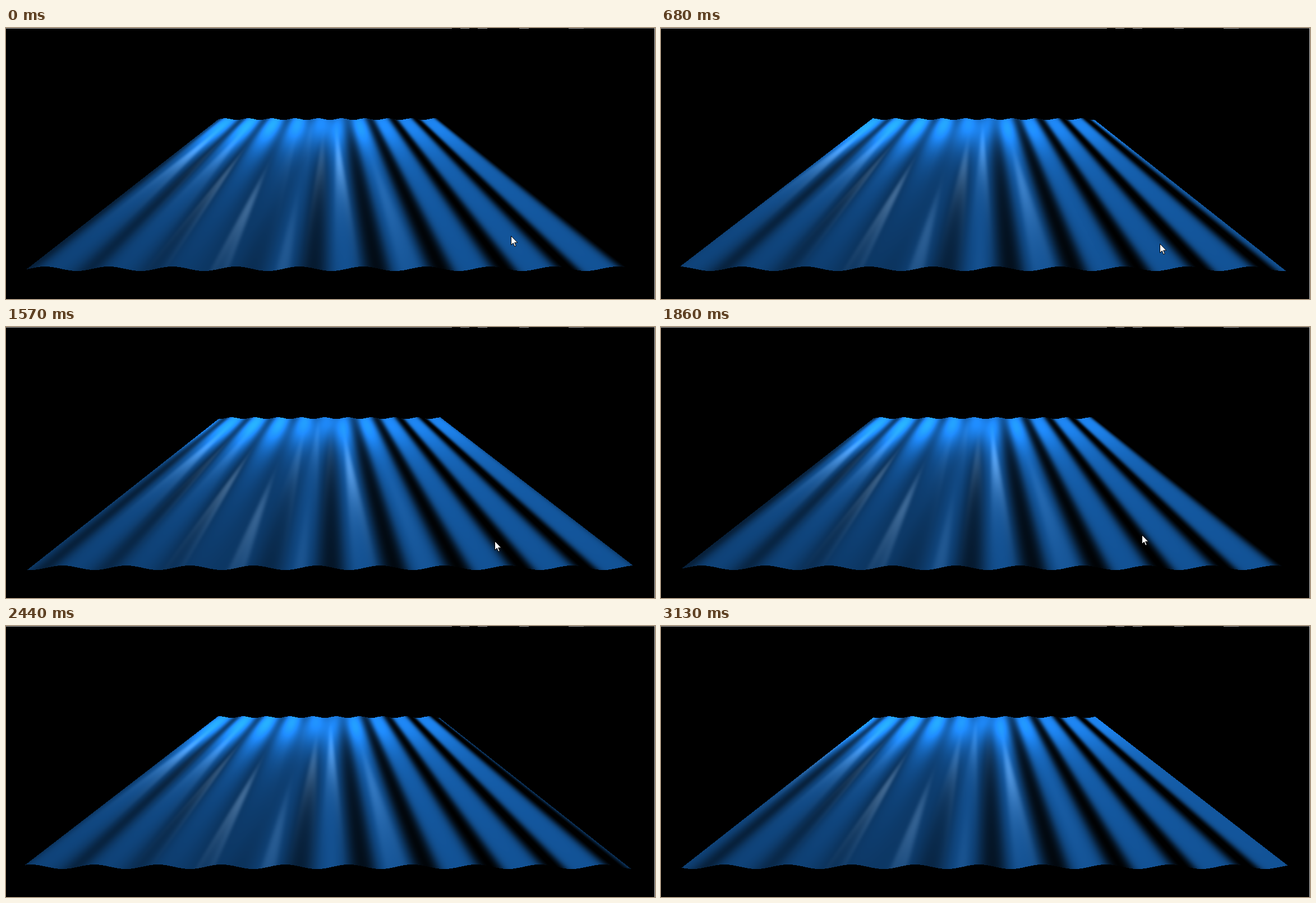
An HTML page with a canvas that plays this animation: 1157x484 px, repeating every 3360 ms.

```html
<!DOCTYPE html>
<html lang="en">
<head>
<meta charset="utf-8">
<title>Wave surface</title>
<style>
  html, body { margin: 0; width: 100%; height: 100%; overflow: hidden; background: #000; }
  canvas { display: block; }
</style>
</head>
<body>
<canvas id="stage" width="1157" height="484"></canvas>
<script>
const ctx = document.getElementById('stage').getContext('2d');
const LOOP = 3360, PERIOD = 113.4;
const CX = 576, HORIZON = 8.4, DEPTH = 421.6;   // vanishing point, height of the near edge below it
const FAR = 0.366, HALF = 540, AMP = 4;
const BOX = { x: 30, y: 156, w: 1092, h: 284 };

// Moments at which the picture advances
const run = (a, b, n) => Array.from({ length: n }, (_, i) => a + (b - a) * i / (n - 1));
const steps = [0, ...run(30, 180, 4), ...run(330, 410, 3), ...run(470, 680, 5),
  ...run(870, 1060, 4), ...run(1120, 1360, 6), ...run(1480, 1570, 3), ...run(1630, 1860, 6),
  1930, 2000, ...run(2060, 2440, 7), 2630, 2910, 3130];

// Keys: time, then value(s)
const drift = [[0, 0], [410, 27], [1060, 55], [1570, 82], [1860, 110.4], [2440, 139], [3130, 183.4]];
const pointer = [[0, 900, 371], [410, 896, 384], [1060, 878, 386], [1570, 871, 382], [1860, 857, 371]];
const POINTER_END = 2060;

function at(keys, t, col = 1) {
  let i = 1;
  while (i < keys.length - 1 && keys[i][0] < t) i++;
  const a = keys[i - 1], b = keys[i];
  const u = Math.min(1, (t - a[0]) / (b[0] - a[0]));
  return a[col] + (b[col] - a[col]) * u;
}

const bell = (v, mid, width) => Math.exp(-(((v - mid) / width) ** 2));
const fadeRight = v => 1 / (1 + Math.exp((v - 160) / 65));

// Values that depend only on the position across the sheet
const across = Array.from({ length: 2 * HALF + 3 }, (_, i) => {
  const X = i - HALF - 1;
  const left = bell(X, -490, 90), mid = bell(X, -60, 58);
  return {
    level: 1 - 0.06 * left,
    glow: 30 + 88 * fadeRight(X),
    rising: 52 * bell(X, -240, 150), risingAt: 1.6 - 0.0023 * (X + 307),
    centre: 62 * bell(X, 45, 85), centreAt: 1.8 - 0.0035 * (X - 33),
    falling: 52 * left + 42 * mid + 24 * bell(X, -370, 50),
    fallingAt: 1.95 - 0.22 * mid
  };
});

// Values that depend only on the distance
const QN = 400, QMAX = 1.75;
const deep = Array.from({ length: QN + 1 }, (_, i) => {
  const q = 1 + i / QN * QMAX;
  return {
    base: 100 + 20 * (q - 1), glow: bell(q, 2.5, 0.5),
    lightX: -190 + 127 * (q - 1), spread: 380 - 47 * (q - 1)
  };
});

const img = ctx.createImageData(BOX.w, BOX.h);

function drawSheet(shift) {
  const px = img.data, w0 = 2 * Math.PI / PERIOD;
  for (let j = 0, o = 0; j < BOX.h; j++) {
    const flat = (BOX.y + j + 0.5 - HORIZON) / DEPTH;
    for (let i = 0; i < BOX.w; i++, o += 4) {
      const dx = BOX.x + i + 0.5 - CX;
      px[o] = px[o + 1] = px[o + 2] = 0;
      px[o + 3] = 255;
      if (Math.abs(dx) > (HALF + 3) * flat + 5) continue;
      let h = -Math.cos((dx / flat - 4 + shift) * w0);
      let s = flat / (1 - AMP / DEPTH * h);
      h = -Math.cos((dx / s - 4 + shift) * w0);
      s = flat / (1 - AMP / DEPTH * h);
      const X = dx / (s * (1 + 0.004 * h));
      if (s < FAR || s > 1 || Math.abs(X) > HALF) continue;

      const slope = Math.sin((X - 4 + shift) * w0), q = 1 / s;
      const a = across[Math.round(X) + HALF + 1];
      const z = deep[Math.min(QN, Math.round((q - 1) / QMAX * QN))];

      // Faces turned to the light brighten, the others darken; troughs lean to the bright side
      const reach = Math.tanh((X - z.lightX) / z.spread);
      const turn = (reach < 0 ? 0.5 : 1.2) * reach * (0.96 * slope - 0.28 * h);
      const lit = Math.max(0, 1 + turn) / Math.sqrt(1 + 0.8 * turn * turn);
      const v = (z.base + a.glow * z.glow) * a.level * lit;

      // Soft white glints on both faces of each wave
      const face = Math.abs(slope), bend = 0.7 * (1 - face);
      let glint = 0;
      if (slope > 0) {
        if (a.rising > 1) glint += a.rising * bell(q, a.risingAt - bend, 0.28);
        if (a.centre > 1) glint += a.centre * bell(q, a.centreAt - bend, 0.38);
      } else if (a.falling > 1) {
        glint = a.falling * bell(q, a.fallingAt - bend, 0.32);
      }
      glint *= face ** 3;
      px[o] = 0.122 * v + glint;
      px[o + 1] = 0.55 * v + glint;
      px[o + 2] = v + glint;
    }
  }
  ctx.putImageData(img, BOX.x, BOX.y);
}

function drawFrame() {
  const bar = (color, x, y, w, h) => {
    ctx.fillStyle = color;
    ctx.fillRect(x, y, w, h);
  };
  bar('#000', 0, 0, 1157, 484);
  bar('#b8b8b8', 0, 0, 1157, 1);
  for (const [x, w] of [[795, 15], [826, 15], [858, 57], [932, 71]]) bar('#222', x, 0, w, 1);
  bar('#666', 1030, 0, 126, 1);
  bar('#d8d8d8', 1156, 0, 1, 484);
}

const arrow = new Path2D('M.5.5V16.5L4.2 13 6.8 19.2 9.2 18.2 6.6 12.2H11.8Z');

function drawPointer(t) {
  ctx.save();
  ctx.translate(Math.round(at(pointer, t, 1)), Math.round(at(pointer, t, 2)));
  ctx.fillStyle = '#fff';
  ctx.strokeStyle = '#000';
  ctx.lineWidth = 1;
  ctx.fill(arrow);
  ctx.stroke(arrow);
  ctx.restore();
}

let shown = -1;
function tick(now) {
  const t = now % LOOP;
  let k = steps.length - 1;
  while (k > 0 && steps[k] > t + 0.01) k--;
  if (k !== shown) {
    shown = k;
    drawFrame();
    drawSheet(at(drift, steps[k]));
    if (steps[k] < POINTER_END) drawPointer(steps[k]);
  }
  requestAnimationFrame(() => tick(performance.now() - start));
}
const start = performance.now();
tick(0);
</script>
</body>
</html>
```
